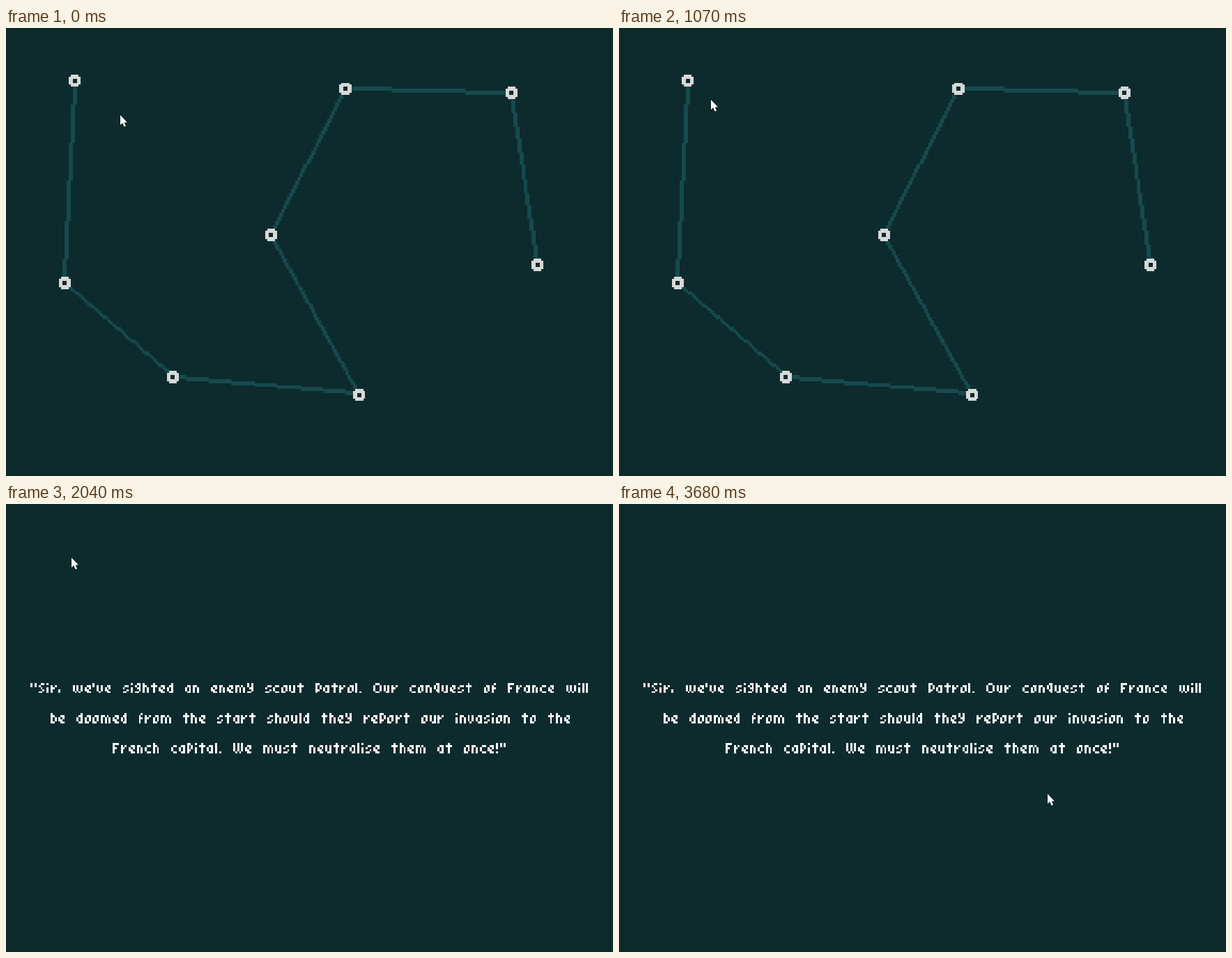
Animation, 871 px wide and 643 px high, one loop 8 s. Source, as an HTML page with a canvas:

```html
<!DOCTYPE html>
<html lang="en">
<head>
<meta charset="utf-8">
<title>Route map</title>
<style>
  html, body { margin: 0; width: 100%; height: 100%; overflow: hidden; background: #0d2b2d; }
  canvas { display: block; }
</style>
</head>
<body>
<canvas id="stage" width="871" height="643" role="img"></canvas>
<script>
const canvas = document.getElementById('stage');
const ctx = canvas.getContext('2d');
const LOOP = 8000, CUT = 2040, BEAT = 60;
const U = 2.878; // size of one chunky pixel
const BACK = '#0d2b2d', ROUTE = '#164a4d', RING = '#d8d8d8', INK = '#fafcfc';

const nodes = [[98.7, 75.7], [84.3, 366], [239.3, 501], [506.8, 526.7],
               [380.3, 297], [487, 87.2], [725.3, 93], [762.7, 340]];

const lines = [
  '"Sir, we\'ve sighted an enemy scout patrol. Our conquest of France will',
  'be doomed from the start should they report our invasion to the',
  'French capital. We must neutralise them at once!"'
];
canvas.setAttribute('aria-label', lines.join(' '));

// Letters are built from shared pen strokes; each pair is a column and a row.
const stem = (x, top = 0, end = 4) => `${x}${top} ${x}${end}`;
const shift = (stroke, dx, dy) =>
  stroke.split(' ').map(p => `${+p[0] + dx}${+p[1] + dy}`).join(' ');
const curve = '21 11 02 03 14 24';
const belly = '11 22 23 14';
const arch = '11 22 24';
const tail = '23 14 04';
const cup = '01 03 14 23 21';
const deepCup = '00 03 14 23 20';
const crook = '20 10 01 12';

const font = {
  a: [curve, stem(2, 1)],
  b: [stem(0), '01 11', belly],
  c: [curve],
  d: [curve, stem(2)],
  e: [curve, '21 22 13'],
  f: ['10 01 04', '02 12'],
  g: [crook, stem(2, 0, 3), tail],
  h: [stem(0), arch],
  i: ['00', stem(0, 2)],
  l: [stem(0)],
  m: [stem(0, 1), arch, shift(arch, 2, 0)],
  n: [stem(0, 1), arch],
  o: ['11 21 23 14 04 02 11'],
  p: [stem(0), '00 10', shift(belly, 0, -1)],
  q: [shift(curve, 0, -1), stem(2)],
  r: [stem(0, 1), '12 21'],
  s: ['21 11 02', tail],
  t: [stem(1), '01 21'],
  u: [cup, stem(2, 1)],
  v: [cup],
  w: [cup, shift(cup, 2, 0)],
  y: ['00 01 12', stem(2, 0, 3), tail],
  F: [stem(0), '00 20', '02 12'],
  O: ['10 20 31 33 24 14 03 01 10'],
  S: [crook, tail],
  W: [deepCup, shift(deepCup, 2, 0)],
  '"': [stem(0, 0, 1), stem(2, 0, 1)],
  "'": [stem(0, 0, 1)],
  ',': [stem(0, 3)],
  '.': ['04'],
  '!': [stem(0, 0, 2), '04']
};

function rect(x, y, w, h) {
  const left = Math.round(x), top = Math.round(y);
  ctx.fillRect(left, top, Math.round(x + w) - left, Math.round(y + h) - top);
}

function disc([x, y], size, color) {
  ctx.fillStyle = color;
  const box = (w, h) => rect(x - w * U / 2, y - h * U / 2, w * U, h * U);
  if (size <= 2) return box(size, size);
  box(size, size - 2);
  box(size - 2, size);
}

function ring(node, size) {
  disc(node, size, RING);
  disc(node, size - 4, BACK);
}

// Stepped line, two chunky pixels thick across its longer axis.
function route([x0, y0], [x1, y1]) {
  const dx = x1 - x0, dy = y1 - y0;
  const steep = Math.abs(dy) > Math.abs(dx);
  const [long, side] = steep ? [dy, dx] : [dx, dy];
  const steps = Math.floor(Math.abs(side) / U + .05);
  const count = Math.round(Math.abs(long) / U);
  const cell = long / count;
  for (let i = 0; i < count; i++) {
    const k = Math.round(((i + .5) / count - .5) * (steps + .2) + steps / 2);
    const off = Math.sign(side) * k * U - U;
    const along = Math.min(i * cell, (i + 1) * cell);
    if (steep) rect(x0 + off, y0 + along, 2 * U, Math.abs(cell));
    else rect(x0 + along, y0 + off, Math.abs(cell), 2 * U);
  }
}

function drawMap(size) {
  ctx.fillStyle = ROUTE;
  for (let i = 1; i < nodes.length; i++) route(nodes[i - 1], nodes[i]);
  nodes.forEach((n, i) => ring(n, i ? 6 : size));
}

// Calls dot(column, row) for every cell the pen passes.
function trace(stroke, dot) {
  const pts = stroke.split(' ').map(p => [+p[0], +p[1]]);
  let [c, r] = pts[0];
  dot(c, r);
  for (const [tc, tr] of pts) {
    while (c !== tc || r !== tr) {
      c += Math.sign(tc - c);
      r += Math.sign(tr - r);
      dot(c, r);
    }
  }
}

function layLine(text, dot) {
  let col = 0;
  for (const ch of text) {
    let width = 4;
    if (ch !== ' ') {
      width = 0;
      font[ch].forEach(stroke => trace(stroke, (c, r) => {
        width = Math.max(width, c + 1);
        dot(col + c, r);
      }));
    }
    col += width + 1;
  }
  return col - 1;
}

function drawText() {
  ctx.fillStyle = INK;
  const widths = lines.map(text => layLine(text, () => {}));
  lines.forEach((text, row) => {
    const indent = Math.round((widths[0] - widths[row]) / 2);
    layLine(text, (c, r) => rect(35.2 + (indent + c) * U, 257 + (row * 15 + r) * U, U, U));
  });
}

function drawCursor([x, y]) {
  const arrow = new Path2D('M0 0V14.2L3.2 11.2L5.6 16.8L8 15.7L5.7 10.4H10Z');
  ctx.save();
  ctx.translate(Math.round(x), Math.round(y));
  ctx.strokeStyle = '#081c1e';
  ctx.lineWidth = 1.4;
  ctx.stroke(arrow);
  ctx.fillStyle = '#fff';
  ctx.fill(arrow);
  ctx.restore();
}

const part = (t, from, to) => Math.min(1, Math.max(0, (t - from) / (to - from)));
const mix = (a, b, f) => a.map((v, i) => v + (b[i] - v) * f);

const rest = [164, 125], near = [100, 82], pick = [94, 77];
const bend = [146, 161], glide = [467, 373], end = [615, 416];

function tipAt(time) {
  const t = Math.floor((time - 20) / BEAT) * BEAT + 20;
  // There and back, then a slowing approach, then a sweep across the text.
  if (t < 800) return mix(rest, near, Math.sin(Math.PI * part(t, 20, 680)));
  if (t < 2600) return mix(rest, pick, 1 - (1 - part(t, 830, 1880)) ** 2.75);
  if (t < 2900) return mix(pick, bend, part(t, 2600, 2900) ** 1.5);
  if (t < 3440) return mix(bend, glide, part(t, 2900, 3440));
  return mix(glide, end, part(t, 3500, 3680));
}

// The first ring pops up under the pointer, overshoots and settles.
function ringSize(t) {
  const start = t < 830 ? 200 : 1430;
  const stop = t < 830 ? 500 : CUT;
  if (t < start || t >= stop) return 6;
  const age = t - start;
  return age > 70 && age < 160 ? 10 : 8;
}

function draw() {
  const t = performance.now() % LOOP;
  ctx.fillStyle = BACK;
  ctx.fillRect(0, 0, 871, 643);
  if (t < CUT) drawMap(ringSize(t));
  else drawText();
  drawCursor(tipAt(t));
  requestAnimationFrame(draw);
}
draw();
</script>
</body>
</html>
```
